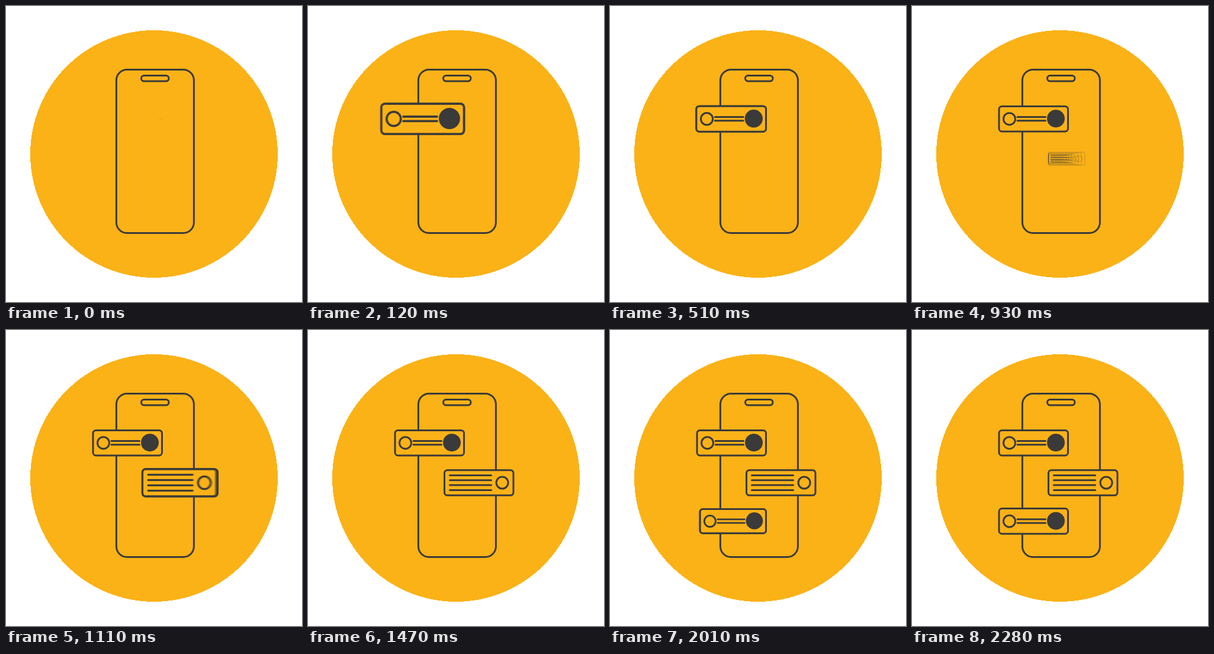
These frames come from a looping animation (500x500 px, 3630 ms). An HTML page without scripts:

```html
<!DOCTYPE html>
<html lang="en">
<head>
<meta charset="utf-8">
<title>Chat cards</title>
<style>
  @property --n { syntax: "<number>"; inherits: true; initial-value: 0; }

  html, body { margin: 0; height: 100%; overflow: hidden; background: #fff; }

  svg {
    display: block; width: 100%; height: 100%;
    fill: #fbb217; stroke: #3a3a3a; stroke-width: 3; stroke-linecap: round;
    animation: tick 3630ms steps(121) -2ms infinite;
  }
  @keyframes tick { from { --n: 0; } to { --n: 121; } }

  /* Each card is a stack of samples spread over half a tick: motion blur. */
  .card use {
    --k: calc(var(--n) - var(--start));
    --t: calc(var(--k) - .4 + .1 * var(--i));
    --u: max(0, var(--t) - 2.1);
    --live: clamp(0, 19 - var(--k), 1);
    --wobble: calc(.39 * exp(-.25 * var(--u)) * sin(var(--u) * 30deg));
    transform: scale(calc(clamp(0, .48 * var(--t), 1) + var(--live) * var(--wobble)));
    transform-origin: 0 0;
    opacity: calc(var(--live) / (var(--i) + 1));
  }
  .card use:nth-child(1) { --i: 0; opacity: 1; }
  .card use:nth-child(2) { --i: 1; }
  .card use:nth-child(3) { --i: 2; }
  .card use:nth-child(4) { --i: 3; }
  .card use:nth-child(5) { --i: 4; }
  .card use:nth-child(6) { --i: 5; }
</style>
</head>
<body>
<svg viewBox="0 0 500 500">
  <defs>
    <g id="msg">
      <rect x="-116.5" y="-21.3" width="116.5" height="42.6" rx="5"/>
      <circle cx="-99" r="10"/>
      <path d="M-85.5-3.2h47.5M-85.5 3.1h47.5"/>
      <circle cx="-20.5" cy="-.5" r="15" fill="#3a3a3a" stroke="none"/>
    </g>
    <g id="reply">
      <rect y="-21.3" width="116.5" height="42.6" rx="5"/>
      <path d="M9-12.6h70M9-4.2h70M9 4.1h70M9 12.5h70"/>
      <circle cx="97.6" r="10"/>
    </g>
  </defs>

  <circle cx="250" cy="250" r="209" stroke="none" shape-rendering="crispEdges"/>
  <rect x="186.4" y="107.5" width="131" height="276" rx="18"/>
  <rect x="228.5" y="117.4" width="46.5" height="9.6" rx="4.8"/>

  <g class="card" style="--start: 0" transform="translate(263.5 190.7)">
    <use href="#msg"/><use href="#msg"/><use href="#msg"/>
    <use href="#msg"/><use href="#msg"/><use href="#msg"/>
  </g>
  <g class="card" style="--start: 30" transform="translate(230.5 258)">
    <use href="#reply"/><use href="#reply"/><use href="#reply"/>
    <use href="#reply"/><use href="#reply"/><use href="#reply"/>
  </g>
  <g class="card" style="--start: 57" transform="translate(263.5 322.9)">
    <use href="#msg"/><use href="#msg"/><use href="#msg"/>
    <use href="#msg"/><use href="#msg"/><use href="#msg"/>
  </g>
</svg>
</body>
</html>
```
